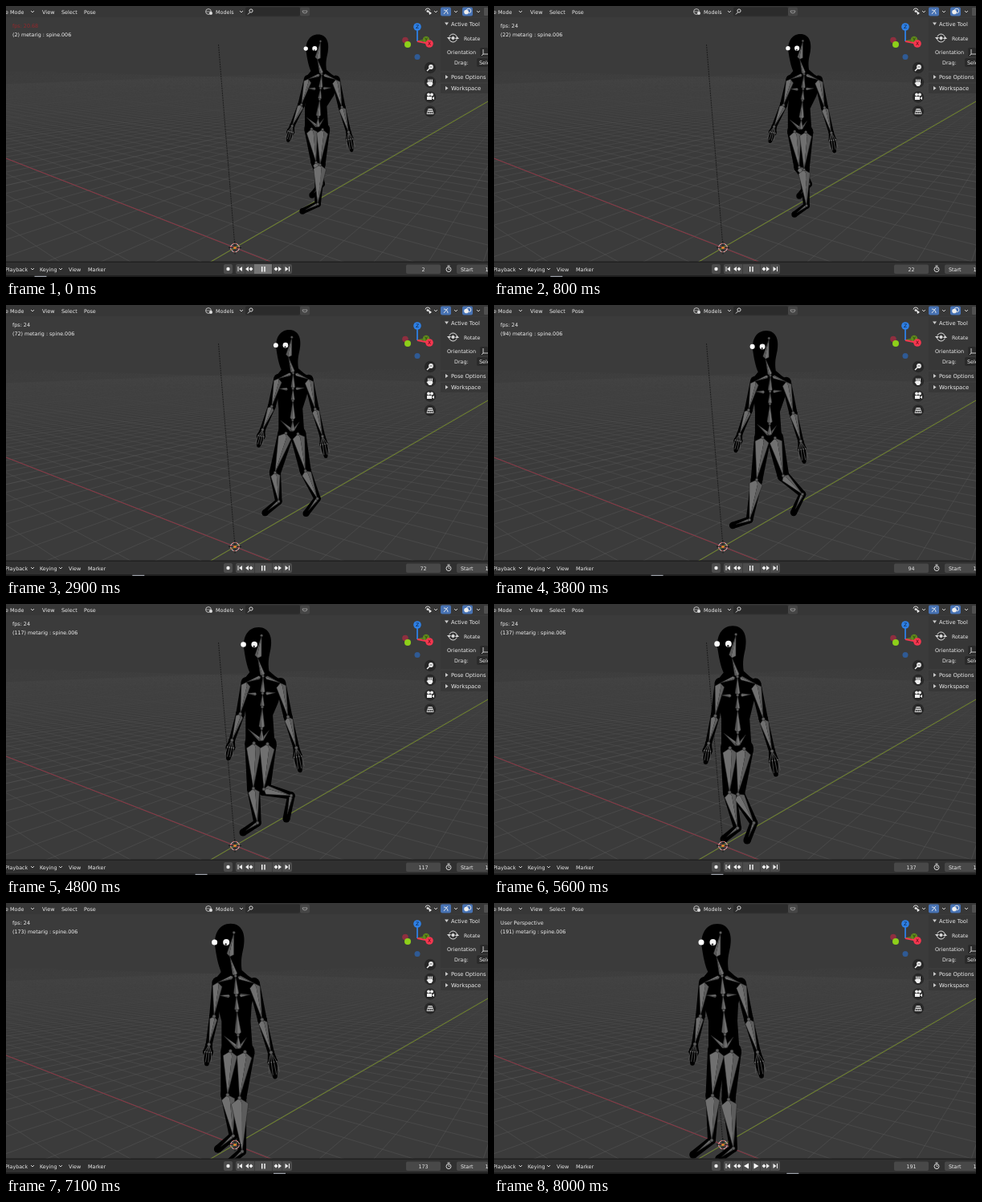
An HTML page with a canvas that plays this animation: 600 px wide and 338 px high, repeating every 8.1 s.

```html
<!DOCTYPE html>
<html>
<head>
<meta charset="utf-8">
<style>
html, body { margin: 0; width: 100%; height: 100%; overflow: hidden; background: #3b3b3b; }
canvas { display: block; width: 600px; height: 338px; }
</style>
</head>
<body>
<canvas id="stage" width="600" height="338"></canvas>
<script>
const stage = document.getElementById('stage');
const back = document.createElement('canvas');
back.width = 600;
back.height = 338;
let g = back.getContext('2d');
const LOOP = 8100, STEP = 100, END = 8000;

// ---- drawing helpers ----
function rect(x, y, w, h, color, r = 0) {
  g.fillStyle = color;
  g.beginPath();
  g.roundRect(x, y, w, h, r);
  g.fill();
}
function disc(x, y, r, color) {
  g.fillStyle = color;
  g.beginPath();
  g.arc(x, y, r, 0, 7);
  g.fill();
}
function ring(x, y, r, color, width = 1, from = 0, to = 7) {
  g.strokeStyle = color;
  g.lineWidth = width;
  g.beginPath();
  g.arc(x, y, r, from, to);
  g.stroke();
}
function line(color, width, ...p) {
  g.strokeStyle = color;
  g.lineWidth = width;
  g.beginPath();
  for (let i = 0; i < p.length; i += 2) g.lineTo(p[i], p[i + 1]);
  g.stroke();
}
function poly(color, ...p) {
  g.fillStyle = color;
  g.beginPath();
  for (let i = 0; i < p.length; i += 2) g.lineTo(p[i], p[i + 1]);
  g.fill();
}
function text(s, x, y, size = 6.4, color = '#ececec', align = 'left') {
  g.font = size + 'px "DejaVu Sans", sans-serif';
  g.textAlign = align;
  g.fillStyle = color;
  g.fillText(s, x, y);
}
const chevron = (x, y) => line('#ccc', 1, x - 2, y - 1, x, y + 1, x + 2, y - 1);

// ---- floor ----
const HORIZON = 72, DIST = 9.5;
function floorAt(u, v) {
  const d = DIST - 0.61 * u + 0.79 * v;
  return [312 + (475 * (0.79 * u + 0.61 * v) - 27 * DIST) / d, HORIZON + 229 * DIST / d];
}
function drawFloor() {
  rect(0, 0, 600, 338, '#3b3b3b');
  const fade = g.createLinearGradient(0, 78, 0, 319);
  fade.addColorStop(0, 'rgba(86,86,86,0)');
  fade.addColorStop(0.12, 'rgba(86,86,86,.13)');
  fade.addColorStop(0.28, 'rgba(86,86,86,.42)');
  fade.addColorStop(0.5, 'rgba(86,86,86,.7)');
  fade.addColorStop(1, 'rgba(86,86,86,.85)');
  for (let i = -90; i <= 90; i++) {
    const w = i % 10 ? 0.6 : 0.9;
    line(fade, w, ...floorAt(-300, i), ...floorAt((DIST + 0.79 * i - 0.6) / 0.61, i));
    line(fade, w, ...floorAt(i, 300), ...floorAt(i, (0.61 * i - DIST + 0.6) / 0.79));
  }
  line('#8d3644', 1, 0, 190, 285, 301.5, 329, 319);
  line('#73892a', 1, 600, 119, 285, 301.5, 255, 319);
  g.setLineDash([2, 1]);
  line('#151515', 0.8, 264.5, 48, 285, 301);
  g.setLineDash([]);
}

// ---- interface ----
function drawHeader() {
  rect(0, 0, 600, 14, 'rgba(52,52,52,.6)');
  text('e Mode', -1, 9.5);
  text('View', 45, 9.5, 6.6);
  text('Select', 69, 9.5);
  text('Pose', 97, 9.5);
  chevron(33, 7);
  ring(252, 7, 3.4, '#ccc', 0.9);
  line('#ccc', 0.7, 249, 7, 255, 7);
  disc(255, 9, 2, '#ddd');
  text('Models', 261, 9.5);
  chevron(293, 7);
  rect(298, 1.5, 68, 11, '#2b2b2b', 2);
  ring(305, 6, 2.1, '#ddd', 1);
  line('#ddd', 1, 303.5, 8, 301, 10.5);
  rect(366, 1.5, 12, 11, '#464646', 2);
  ring(372, 6, 3, '#999', 0.9, 0, Math.PI);
  line('#999', 0.9, 369, 6, 375, 6);
  ring(525, 6, 3, '#ddd', 1, 3.3, 6.1);
  disc(525, 6.5, 1.5, '#ddd');
  poly('#eee', 526, 6, 530, 9, 527, 11);
  chevron(535, 7);
  rect(541, 1.5, 13, 11, '#4772b3', 2);
  ring(545, 10, 5, '#eee', 0.9, 4.7, 6.3);
  line('#eee', 0.9, 545, 10, 550, 4);
  chevron(560, 7);
  rect(568, 1.5, 13, 11, '#4772b3', 2);
  disc(573, 7.5, 2.8, '#eee');
  ring(576, 6, 2.8, '#eee', 0.9);
  chevron(588, 7);
  rect(595, 2, 5, 10, '#505050', 1);
}
function drawSidebar() {
  const panel = 'rgba(54,54,54,.8)';
  rect(541, 15, 59, 66, panel);
  rect(541, 83, 59, 12, panel);
  rect(541, 97, 59, 12, panel);
  poly('#ccc', 546, 20.5, 551, 20.5, 548.5, 24);
  poly('#ccc', 547, 86, 547, 91, 550.5, 88.5);
  poly('#ccc', 547, 100, 547, 105, 550.5, 102.5);
  text('Active Tool', 554, 24.5, 6.7);
  text('Pose Options', 554, 91, 6.7);
  text('Workspace', 554, 105, 6.8);
  ring(556.5, 40, 5, '#ddd', 1, 0.3, 2.8);
  ring(556.5, 40, 5, '#ddd', 1, 3.5, 6);
  poly('#ddd', 556.5, 37.5, 559, 40, 556.5, 42.5, 554, 40);
  poly('#ddd', 549, 39, 554, 39, 551.5, 42);
  poly('#ddd', 559, 41, 564, 41, 561.5, 38);
  text('Rotate', 570, 42.5, 6.2);
  text('Orientation', 549, 60);
  text('Drag:', 558, 73);
  rect(590, 52, 10, 11, '#2a2a2a', 2);
  line('#ddd', 0.9, 594, 54, 594, 60, 600, 60);
  line('#ddd', 0.9, 594, 60, 592, 62);
  rect(586, 65, 14, 11, '#2a2a2a', 2);
  text('Select', 589, 73);
}
function drawGizmo() {
  disc(512, 63.5, 3.5, '#2f5a94');
  disc(497, 42.5, 3.8, '#8e2f3f');
  line('#5f8a1c', 1.5, 512, 44, 523, 42);
  disc(523, 42, 4.2, '#5f8a1c');
  text('Y', 523, 44.2, 6, '#1c2a08', 'center');
  line('#2e80e6', 1.8, 512, 44, 512, 26);
  disc(512, 26, 4.8, '#2e80e6');
  text('Z', 512, 28.3, 6, '#0a1c36', 'center');
  line('#f5364f', 1.8, 512, 44, 527, 47);
  disc(527, 47, 4.8, '#f5364f');
  text('X', 527, 49.3, 6, '#400a12', 'center');
  disc(500, 48, 4, '#8dcf1a');

  for (const y of [77, 95, 113.5, 131.5]) disc(528, y, 7.2, 'rgba(34,34,34,.75)');
  disc(529, 76, 2.9, '#eee');
  line('#eee', 1.4, 527, 78, 524, 81);
  line('#333', 0.7, 527.5, 76, 530.5, 76);
  poly('#eee', 525.5, 95, 530.5, 95, 531.5, 97, 529.5, 100, 526.5, 100, 523.5, 96);
  for (let i = 0; i < 4; i++) line('#eee', 1, 526 + i * 1.4, 96, 525.5 + i * 1.7, 91.5);
  disc(526, 110.5, 1.9, '#eee');
  disc(530, 110.5, 1.9, '#eee');
  rect(524, 113, 6, 4, '#eee');
  poly('#eee', 530, 115, 533, 113, 533, 117);
  for (let i = 0; i < 4; i++) line('#eee', 0.8, 526 + i * 1.4, 128.5, 524 + i * 2.7, 134.5);
  for (const y of [128.5, 131.5, 134.5]) line('#eee', 0.8, 525.5 - (y - 129) / 3.5, y, 530.5 + (y - 129) / 3.5, y);
}
function drawTimeline() {
  rect(0, 319, 600, 19, '#303030');
  rect(0, 318.5, 600, 1.5, '#212121');
  rect(0, 336, 600, 2, '#1d1d1d');
  text('Playback', -1, 330.5, 6.3);
  text('Keying', 42, 330.5);
  text('View', 78, 330.5);
  text('Marker', 102, 330.5);
  chevron(33, 328);
  chevron(68, 328);
  rect(271, 322, 11, 12, '#4c4c4c', 2);
  disc(276.5, 328, 2.2, '#eee');
  rect(286, 322, 70, 12, '#4c4c4c', 2);
  rect(288.5, 325, 1, 6, '#eee');
  poly('#eee', 294, 325, 294, 331, 290, 328);
  poly('#eee', 302, 325, 302, 331, 298, 328);
  poly('#eee', 305, 325.5, 307.5, 328, 305, 330.5, 302.5, 328);
  poly('#eee', 339, 325, 339, 331, 343, 328);
  poly('#eee', 336, 325.5, 338.5, 328, 336, 330.5, 333.5, 328);
  poly('#eee', 347.5, 325, 347.5, 331, 351.5, 328);
  rect(352, 325, 1, 6, '#eee');
  rect(498, 322.5, 43, 11.5, '#484848', 2);
  ring(551, 328.5, 3, '#ddd', 1);
  line('#ddd', 0.8, 551, 326.5, 551, 328.5, 552.5, 328.5);
  line('#ddd', 1, 549.5, 324, 552.5, 324);
  rect(561, 322.5, 39, 11.5, '#484848', 2);
  text('Start', 566, 330.5);
  text('1', 596.5, 330.5);
}
function drawStatus(t) {
  const frame = Math.min(191, Math.round(2.42 + 0.02397 * t));
  if (t >= END) text('User Perspective', 8, 27);
  else if (t < STEP) text('fps: 20.68', 8, 27, 6.4, '#94282c');
  else text('fps: 24', 8, 27);
  text(`(${frame}) metarig : spine.006`, 8, 37.8, 6.35, '#f2f2f2');
  text(frame, 519.5, 330.5, 6.4, '#e4e4e4', 'center');
  rect(32 + 1.74 * frame, 336.7, 15, 1.3, '#989ca4'); // top of the playhead
  for (const x of [297.5, 309, 331, 343.5]) rect(x, 322, 0.6, 12, '#333');
  if (t >= END) {
    poly('#fff', 317, 324.5, 317, 331.5, 311, 328);
    poly('#fff', 323.5, 324.5, 323.5, 331.5, 329.5, 328);
    rect(320, 322, 0.6, 12, '#333');
  } else {
    if (t < STEP) rect(309, 322, 22, 12, '#777');
    rect(318, 325, 1.4, 6.5, '#fff');
    rect(321.3, 325, 1.4, 6.5, '#fff');
  }
}

// ---- walking figure ----
// time, scale, arm swing, then x,y of: neck, pelvis, right knee, ankle, toe, left knee, ankle, toe
const POSES = [
  [0, .76, -33, 393, 85, 388, 148, 386, 195, 393, 222, 381, 236, 391, 198, 388, 247, 369, 256],
  [800, .77, -33, 386, 85, 382, 151, 380, 201, 392, 222, 380, 237, 386, 204, 389, 249, 374, 260],
  [2100, .81, -31, 368, 83, 367, 151, 344, 203, 361, 226, 348, 246, 379, 204, 387, 247, 371, 262],
  [3800, .86, -28, 344, 88, 343, 159, 327, 218, 318, 268, 297, 275, 360, 213, 384, 236, 373, 259],
  [4800, .94, -24, 320, 90, 318, 167, 308, 230, 313, 273, 295, 285, 321, 231, 355, 239, 349, 268],
  [6400, 1, -14, 290, 91, 293, 177, 281, 238, 292, 286, 275, 301, 293, 241, 298, 305, 286, 319],
  [8000, 1, -15, 284, 91, 288, 177, 272, 240, 271, 296, 248, 314, 292, 245, 298, 306, 280, 319]
];
function poseAt(t) {
  const last = POSES.length - 1;
  let i = 0;
  while (i < last - 1 && t >= POSES[i + 1][0]) i++;
  const a = POSES[i], b = POSES[i + 1], p = POSES[Math.max(0, i - 1)], n = POSES[Math.min(last, i + 2)];
  const h = b[0] - a[0], k = Math.min(1, (t - a[0]) / h), k2 = k * k, k3 = k2 * k;
  return a.map((v, j) => {
    const m0 = (b[j] - p[j]) / (b[0] - p[0]) * h, m1 = (n[j] - a[j]) / (n[0] - a[0]) * h;
    return v + (b[j] - v) * (3 * k2 - 2 * k3) + m0 * (k3 - 2 * k2 + k) + m1 * (k3 - k2);
  });
}
const mix = (a, b, k) => [a[0] + (b[0] - a[0]) * k, a[1] + (b[1] - a[1]) * k];

function limb([ax, ay], [bx, by], ra, rb) {
  const d = Math.hypot(bx - ax, by - ay) || 1, nx = (ay - by) / d, ny = (bx - ax) / d;
  disc(ax, ay, ra, '#000');
  disc(bx, by, rb, '#000');
  poly('#000', ax + nx * ra, ay + ny * ra, bx + nx * rb, by + ny * rb,
    bx - nx * rb, by - ny * rb, ax - nx * ra, ay - ny * ra);
}
// Octahedral bone: widest close to its root, in two shades
function bone([ax, ay], [bx, by], w = 0.15) {
  const dx = bx - ax, dy = by - ay, mx = ax + dx * 0.11, my = ay + dy * 0.11;
  const lx = mx - dy * w, ly = my + dx * w, rx = mx + dy * w, ry = my - dx * w;
  const cx = mx + dy * w * 0.25, cy = my - dx * w * 0.25;
  poly('#707070', ax, ay, lx, ly, bx, by, cx, cy);
  poly('#5c5c5c', ax, ay, rx, ry, bx, by, cx, cy);
  line('#202020', 0.5, ax, ay, lx, ly, bx, by, rx, ry, ax, ay);
}
function joint([x, y], s) {
  disc(x, y, 2.1 * s, '#5e5e5e');
  ring(x, y, 2.1 * s, '#1c1c1c', 0.5);
}
function fingers([ax, ay], [bx, by]) {
  const dx = bx - ax, dy = by - ay;
  for (let i = -1.5; i < 2; i++) {
    const w = i * 0.11, kx = ax + dx * 0.4 - dy * w, ky = ay + dy * 0.4 + dx * w;
    const reach = 0.96 - Math.abs(i) * 0.07;
    line('#585858', 0.8, ax, ay, kx, ky, ax + dx * reach - dy * w * 1.3, ay + dy * reach + dx * w * 1.3);
    disc(kx, ky, 0.8, '#777');
  }
}
function drawFigure(t) {
  const pose = poseAt(t), s = pose[1], swing = pose[2];
  const pt = i => [pose[3 + 2 * i], pose[4 + 2 * i]];
  const neck = pt(0), pelvis = pt(1);
  const off = ([x, y], dx, dy) => [x + dx * s, y + dy * s];
  const spine = k => mix(pelvis, neck, k);
  const N = (x, y) => off(neck, x, y), P = (x, y) => off(pelvis, x, y);
  const shR = N(-22, 8), shL = N(23, 9);
  const arms = [
    [shR, off(shR, swing * 0.34, 42), off(shR, swing * 0.8, 77), off(shR, swing, 101)],
    [shL, off(shL, 10, 45), off(shL, 21, 86), off(shL, 26, 116)]
  ];
  const legs = [
    [P(-10, 7), pt(2), pt(3), pt(4)],
    [P(8, 8), pt(5), pt(6), pt(7)]
  ];

  // body
  poly('#000', ...N(-17, -6), ...N(-27, 6), ...N(-24, 30), ...P(-21, -30), ...P(-21, 8),
    ...P(-8, 20), ...P(18, 14), ...P(15, -30), ...N(20, 35), ...N(28, 8), ...N(16, 0), ...N(8, -7));
  g.fillStyle = '#000';
  g.beginPath();
  g.moveTo(...N(-6, -65));
  g.bezierCurveTo(...N(8, -65), ...N(13, -52), ...N(10, -36));
  g.bezierCurveTo(...N(8, -26), ...N(6, -20), ...N(8, -6));
  g.lineTo(...N(-17, -4));
  g.bezierCurveTo(...N(-20, -9), ...N(-23, -20), ...N(-25, -34));
  g.bezierCurveTo(...N(-28, -52), ...N(-20, -65), ...N(-6, -65));
  g.fill();
  for (const [a, b, c, d] of arms) {
    limb(a, b, 7 * s, 5.8 * s);
    limb(b, c, 5.8 * s, 4 * s);
    limb(c, mix(c, d, 0.4), 4 * s, 6.2 * s);
    limb(mix(c, d, 0.4), d, 6.2 * s, 2.8 * s);
  }
  for (const [a, b, c, d] of legs) {
    limb(a, b, 12 * s, 8.5 * s);
    limb(b, c, 8.5 * s, 5 * s);
    limb(c, d, 5 * s, 4.8 * s);
  }

  // skeleton
  for (const [a, b, c, d] of legs) {
    bone(a, b, 0.16);
    bone(b, c, 0.16);
    bone(c, mix(c, d, 0.8), 0.08);
    [a, b, c].forEach(p => joint(p, s));
  }
  for (const [a, b, c, d] of arms) {
    bone(a, b, 0.14);
    bone(b, c, 0.13);
    fingers(c, d);
    [b, c].forEach(p => joint(p, s));
  }
  const root = P(0, 4), chest = spine(0.72);
  bone(root, P(-18, -12), 0.1);
  bone(root, P(10, -10), 0.1);
  bone(root, spine(0.15), 0.2);
  bone(spine(0.15), spine(0.5), 0.13);
  bone(spine(0.5), chest, 0.15);
  bone(chest, neck, 0.13);
  bone(off(chest, -8, 1), off(chest, -21, 0), 0.16);
  bone(off(chest, 4, 0), off(chest, 17, -1), 0.16);
  bone(N(-3, 1), shR, 0.11);
  bone(N(3, 1), shL, 0.11);
  bone(neck, N(-7, -24), 0.12);
  bone(N(-7, -24), N(-2, -53), 0.15);
  for (const p of [spine(0.15), spine(0.5), chest, neck, N(-2, -54)]) joint(p, s * 0.8);

  // eyes
  const eyeR = N(-26, -42), eyeL = N(-11.5, -42);
  line('#000', 1.4, ...eyeR, ...eyeL);
  disc(...eyeR, 3.5 * s, '#fff');
  disc(...eyeL, 4 * s, '#f4f4f4');
  disc(...off(eyeL, -0.5, 2.6), 1.2 * s, '#222');
}
function drawCursor() {
  const x = 285, y = 301.5;
  ring(x, y, 5.3, '#eee', 1);
  g.setLineDash([2.1, 2.1]);
  ring(x, y, 5.3, '#c33a3a', 1);
  g.setLineDash([]);
  for (const [dx, dy] of [[1, 0], [-1, 0], [0, 1], [0, -1]])
    line('#111', 0.8, x + dx * 3, y + dy * 3, x + dx * 8, y + dy * 8);
  disc(x, y, 1.6, '#f08a2c');
}

drawFloor();
drawHeader();
drawSidebar();
drawGizmo();
drawTimeline();
g = stage.getContext('2d');
const start = performance.now();

function render() {
  const t = Math.floor((performance.now() - start) % LOOP / STEP) * STEP;
  g.drawImage(back, 0, 0);
  g.save();
  g.beginPath();
  g.rect(0, 0, 600, 318.5);
  g.clip();
  drawFigure(t);
  drawCursor();
  g.restore();
  drawStatus(t);
  requestAnimationFrame(render);
}
render();
</script>
</body>
</html>
```
